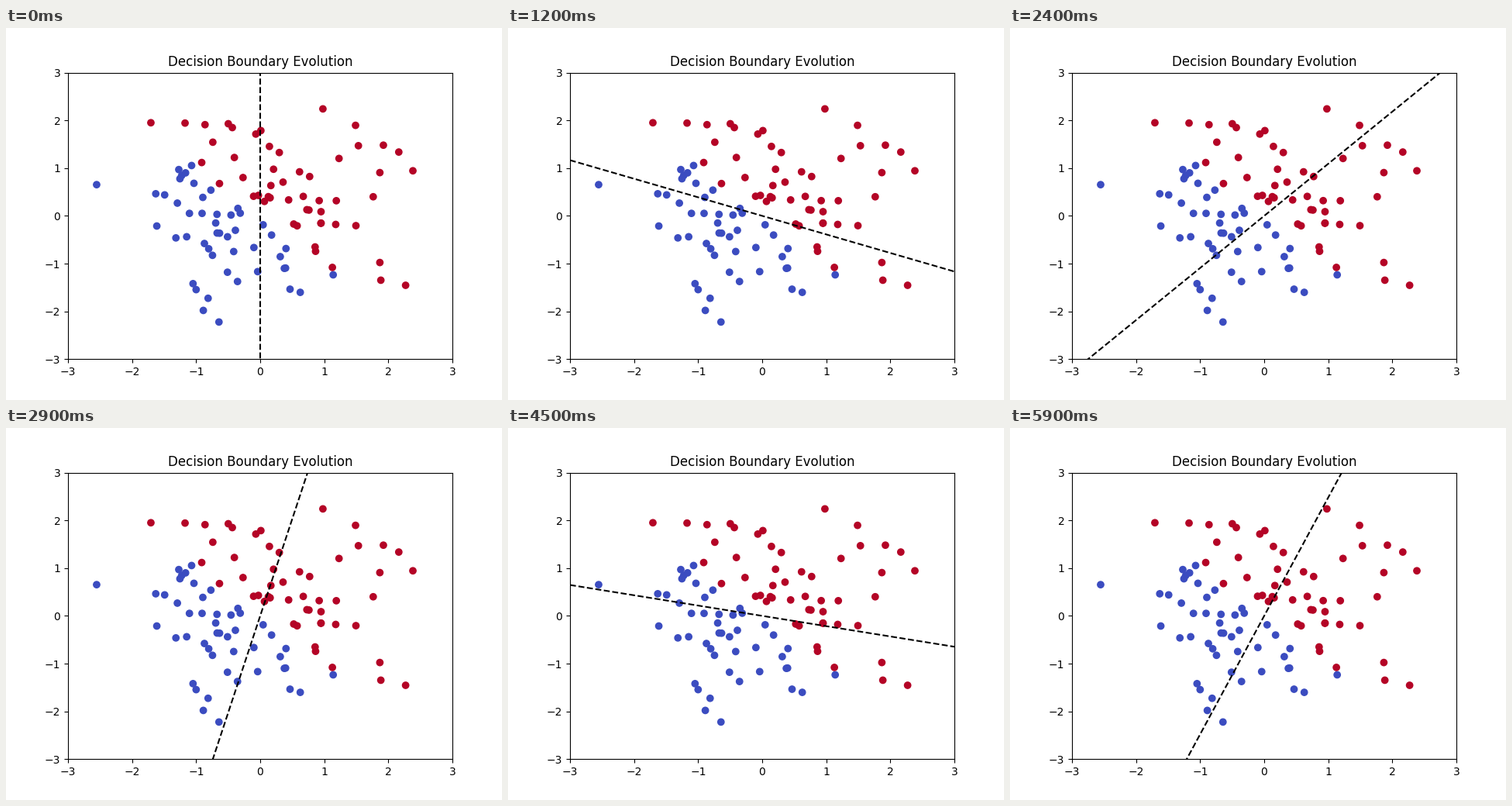
A matplotlib script for the animation above (6 s loop, 640x480 px).

```python
import numpy as np
import matplotlib.pyplot as plt
from matplotlib.animation import FuncAnimation

LIMIT = 3
FRAMES = 60
STEP = 0.1  # radians turned per frame

np.random.seed(0)
points = np.random.randn(100, 2)
labels = (points.sum(axis=1) > 0).astype(int)

fig, ax = plt.subplots(figsize=(6.4, 4.8), dpi=100)
ax.scatter(points[:, 0], points[:, 1], c=labels, cmap="coolwarm")
ax.set_xlim(-LIMIT, LIMIT)
ax.set_ylim(-LIMIT, LIMIT)
ax.set_title("Decision Boundary Evolution")

xs = np.array([-LIMIT, LIMIT])
boundary, = ax.plot([], [], "k--", lw=1.5)


def update(frame):
    """Draw the line perpendicular to the rotating weight vector."""
    angle = STEP * frame
    # The small offset keeps the vertical boundary finite.
    slope = -np.cos(angle) / (np.sin(angle) + 1e-5)
    boundary.set_data(xs, slope * xs)
    return boundary,


anim = FuncAnimation(fig, update, frames=FRAMES, interval=100,
                     repeat=True, repeat_delay=0)
plt.show()
```
